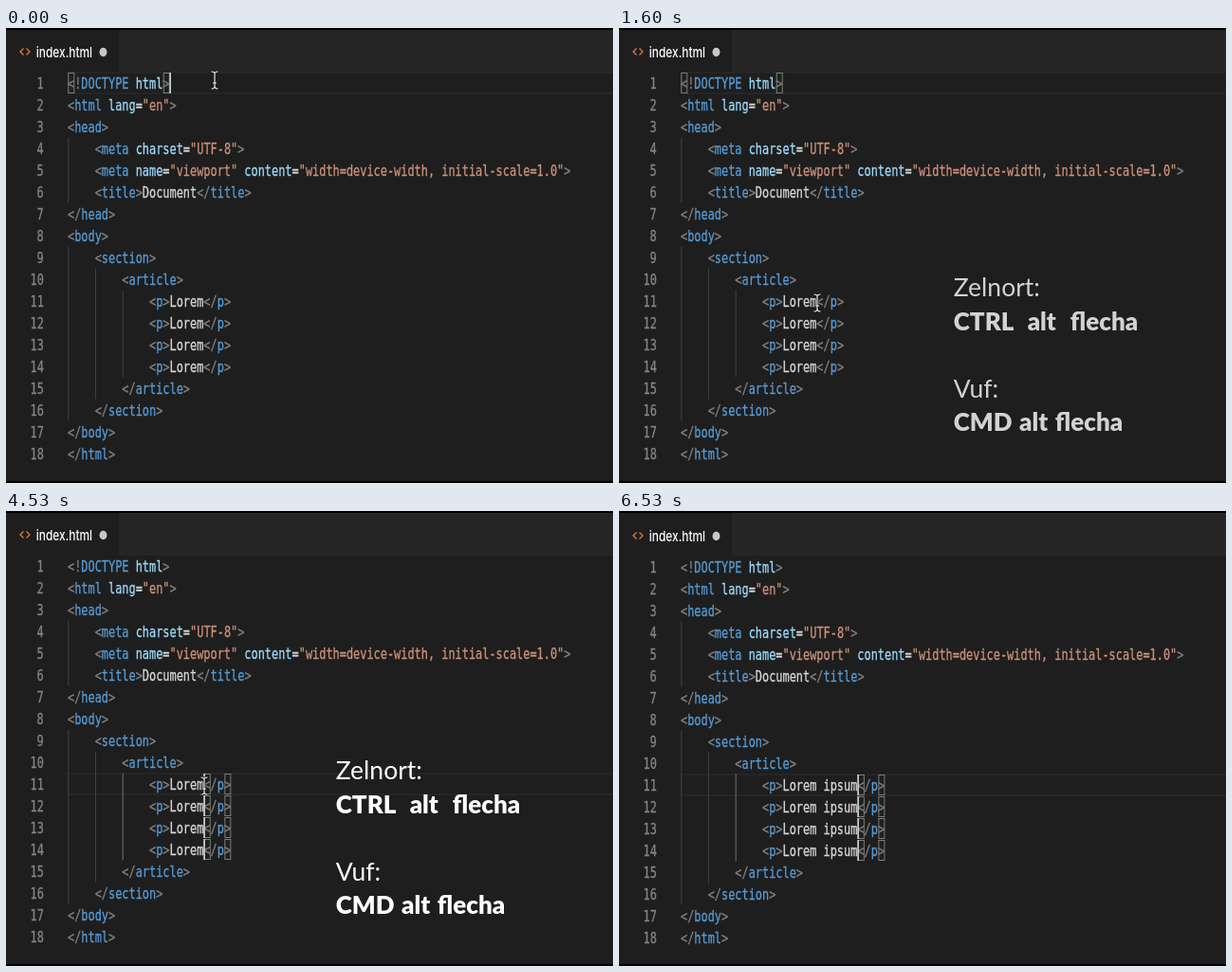
Recreate the animation shown at these times as an HTML page. Size 640 by 480 pixels, loop 6730 ms.

```html
<!DOCTYPE html>
<html lang="en">
<head>
<meta charset="utf-8">
<title>Multi-cursor editing</title>
<style>
html, body { margin: 0; width: 100%; height: 100%; overflow: hidden; background: #1e1e1e; }
svg { display: block; width: 640px; height: 480px; }
text { white-space: pre; }
.mono { font: 15px "DejaVu Sans Mono", monospace; stroke-width: .3px; }
.tab { font: 500 15px Inter, sans-serif; }
.tip { font: 400 26.5px Lato, sans-serif; fill: #fff; }
.keys { font-weight: 900; font-size: 26px; word-spacing: 1.5px; }
.bracket { fill: #006400; fill-opacity: .06; stroke: #7c7c78; }
.caret { fill: #dcdcdc; }
</style>
</head>
<body>
<svg id="stage" viewBox="0 0 640 480"></svg>
<script>
const LOOP = 6730, STEP = 1000 / 15;
const SQUEEZE = 0.7945;
const LEFT = 65, CELL = 9.031 * SQUEEZE, ROW = 23, TOP = 46.5;
const FIRST = 11, COUNT = 4, TEXT_END = 20;
const COLORS = { mark: '#808080', tag: '#569cd6', attr: '#9cdcfe', string: '#ce9178', plain: '#d8d8d8' };

const SOURCE = `<!DOCTYPE html>
<html lang="en">
<head>
    <meta charset="UTF-8">
    <meta name="viewport" content="width=device-width, initial-scale=1.0">
    <title>Document</title>
</head>
<body>
    <section>
        <article>
            <p>Lorem</p>
            <p>Lorem</p>
            <p>Lorem</p>
            <p>Lorem</p>
        </article>
    </section>
</body>
</html>`.split('\n');

const stage = document.getElementById('stage');

function add(parent, name, attrs = {}, content = '') {
  const node = document.createElementNS('http://www.w3.org/2000/svg', name);
  for (const key in attrs) node.setAttribute(key, attrs[key]);
  node.textContent = content;
  parent.appendChild(node);
  return node;
}
const set = (node, attrs) => { for (const key in attrs) node.setAttribute(key, attrs[key]); };
const show = (node, on) => node.setAttribute('visibility', on ? 'visible' : 'hidden');
const colX = col => LEFT + col * CELL;
const rowY = row => TOP + (row - 1) * ROW;
const rect = (parent, x, y, width, height, fill) => add(parent, 'rect', { x, y, width, height, fill });
const ink = color => ({ fill: color, stroke: color });

function label(parent, x, y, content, cls = 'mono', color = COLORS.plain, anchor = 'start') {
  const transform = `translate(${x} ${y}) scale(${SQUEEZE} 1)`;
  return add(parent, 'text', { transform, class: cls, ...ink(color), 'text-anchor': anchor }, content);
}

function paintCode(node, line) {
  node.textContent = '';
  const span = (kind, s) => s && add(node, 'tspan', ink(COLORS[kind]), s);
  for (const part of line.match(/<[^>]*>|[^<]+/g)) {
    const tag = part.match(/^(<[!\/]?)(\w+)(.*)(>)$/);
    if (!tag) { span('plain', part); continue; }
    span('mark', tag[1]);
    span('tag', tag[2]);
    for (const piece of tag[3].match(/"[^"]*"|=|[^="]+/g) || [])
      span(piece[0] === '"' ? 'string' : piece === '=' ? 'plain' : 'attr', piece);
    span('mark', tag[4]);
  }
}

// Window background
rect(stage, 0, 0, 640, 480, '#1e1e1e');
rect(stage, 119, 2, 521, 45, '#252526');

const screen = add(stage, 'g');
add(screen, 'path', { d: 'M18.5 21.5L15 25L18.5 28.5M21.5 21.5L25 25L21.5 28.5', fill: 'none', stroke: '#e37933', 'stroke-width': 1.3 });
add(screen, 'text', { transform: `translate(31.8 30.5) scale(${SQUEEZE} 1)`, class: 'tab', fill: '#fff' }, 'index.html');
add(screen, 'ellipse', { cx: 102.5, cy: 25.5, rx: 4, ry: 4.7, fill: '#c8c8c8' });

const lineBox = add(screen, 'rect', { x: LEFT + .5, width: 600, height: ROW - 1, fill: 'none', stroke: '#282828', 'stroke-width': 1.5 });
const guide = (col, from, to) => rect(screen, colX(col) + .3, rowY(from), 1, (to - from + 1) * ROW, '#404040');
guide(0, 4, 6);
guide(0, 9, 16);
guide(4, 10, 15);
const innerGuide = guide(8, 11, 14);

const lines = SOURCE.map((line, i) => {
  const y = rowY(i + 1) + 17;
  label(screen, 39.8, y, i + 1, 'mono', '#858585', 'end');
  const node = label(screen, LEFT, y, '');
  paintCode(node, line);
  return node;
});

const bracket = (row, col) => add(screen, 'rect', { class: 'bracket', x: colX(col) + .8, y: rowY(row) + 1, width: 6, height: ROW - 2 });
const caret = (row, col) => add(screen, 'rect', { class: 'caret', x: colX(col) - .2, y: rowY(row) + .5, width: 1.5, height: ROW - 1 });

const topOpen = bracket(1, 0), topClose = bracket(1, 14), topCaret = caret(1, 15);
const cursors = Array.from({ length: COUNT }, (_, i) => ({
  row: FIRST + i,
  open: bracket(FIRST + i, TEXT_END),
  close: bracket(FIRST + i, TEXT_END + 3),
  caret: caret(FIRST + i, TEXT_END)
}));

// Suggestion list
const popup = add(screen, 'g');
add(popup, 'rect', { x: 223.5, y: 300.5, width: 430, height: 200, fill: '#252526', stroke: '#454545' });
rect(popup, 224, 301, 416, ROW, '#062f4a');
['i', 'ifr', 'iframe', 'img', 'img:s', 'img:sizes', 'img:srcset', 'img:z'].forEach((word, i) => {
  const y = 312 + i * ROW;
  add(popup, 'path', {
    transform: `translate(233.5 ${y})`, fill: 'none', stroke: '#c5c5c5', 'stroke-width': 1.2,
    d: 'M-6 4.5L0-1.5C-1-5 2-8 5-7L2.5-4L4-2L7-4.5C8-1 5 2 1.5 1L-4 7Q-7 7.5-6 4.5Z'
  });
  const item = label(popup, 246, y + 5, '');
  add(item, 'tspan', { ...ink('#1e87f0'), 'font-weight': 700 }, word[0]);
  add(item, 'tspan', {}, word.slice(1));
});
label(popup, 637.5, 317, 'Emmet Abbreviation', 'mono', '#a9b0b5', 'end');

// Shortcut captions
const tips = add(stage, 'g');
[[283, 'Zelnort:', ''], [318.5, 'CTRL  alt  flecha', ' keys'], [390, 'Vuf:', ''], [424.5, 'CMD alt flecha', ' keys']]
  .forEach(([y, words, cls]) => add(tips, 'text', { x: 0, y, class: 'tip' + cls }, words));

// Mouse pointer
const mouse = add(stage, 'g', { fill: 'none' });
const beam = 'M-3.5-9Q0-9 0-6.5Q0-9 3.5-9M0-7V7M-3.5 9Q0 9 0 6.5Q0 9 3.5 9M-2 3H2';
add(mouse, 'path', { d: beam, stroke: '#111', 'stroke-width': 2.6 });
add(mouse, 'path', { d: beam, stroke: '#eee', 'stroke-width': 1.2 });

rect(stage, 0, 0, 640, 2, '#000');
rect(stage, 0, 478, 640, 2, '#000');

const PATH = [[130, 220, 55], [600, 246, 299], [1070, 208, 288], [1600, 209, 290]];
function mouseAt(t) {
  if (t <= PATH[0][0]) return PATH[0].slice(1);
  for (let i = 1; i < PATH.length; i++) {
    const [t0, x0, y0] = PATH[i - 1], [t1, x1, y1] = PATH[i];
    if (t > t1) continue;
    const u = (t - t0) / (t1 - t0), k = u * u * (3 - 2 * u);
    return [x0 + (x1 - x0) * k, y0 + (y1 - y0) * k];
  }
  return PATH[PATH.length - 1].slice(1);
}

const CLICK = 2330, CUT = 5065;
const ADDED = [CLICK, 2865, 3200, 3530];
const KEYS = [4670, CUT, 5200, 5400, 5530, 5730];
const HIDDEN = [[600, 1065], [1530, 2000], [2800, 2865], [4065, 4530], [5930, 6130], [6330, 6530]];
const within = (t, [from, to]) => t >= from && t < to;
let shownText = '';

function render(ms) {
  const t = Math.floor((ms + 4) / STEP) * STEP;
  const clicked = t >= CLICK, lit = !HIDDEN.some(span => within(t, span));
  const typed = ' ipsum'.slice(0, KEYS.filter(k => t >= k).length);

  set(screen, { transform: `translate(0 ${t >= CUT ? 1 : 0})` });
  set(lineBox, { y: rowY(clicked ? FIRST : 1) + .5 });
  set(innerGuide, { fill: clicked ? '#707070' : '#404040' });
  show(topOpen, t < 2000);
  show(topClose, !clicked);
  show(topCaret, !clicked && lit);

  cursors.forEach((c, i) => {
    const end = TEXT_END + typed.length;
    if (typed !== shownText) paintCode(lines[c.row - 1], SOURCE[c.row - 1].replace('Lorem', 'Lorem' + typed));
    set(c.open, { x: colX(end) + .8 });
    set(c.close, { x: colX(end + 3) + .8 });
    set(c.caret, { x: colX(end) - .2 });
    const paired = t >= ADDED[i] + (i ? 65 : 0);
    show(c.open, paired);
    show(c.close, paired);
    show(c.caret, lit && t >= ADDED[i]);
  });
  shownText = typed;

  show(popup, within(t, [5130, 5265]));

  const rest = Math.max(0, 1 - t / 2000);
  set(tips, { transform: `translate(${347.8 + 125 * rest * rest} 0)`, opacity: 1 - rest });
  show(tips, within(t, [130, CUT]));

  set(mouse, { transform: `translate(${mouseAt(t).join(' ')})` });
  show(mouse, t < KEYS[0]);
}

const start = performance.now();
function tick() {
  render((performance.now() - start) % LOOP);
  requestAnimationFrame(tick);
}
tick();
</script>
</body>
</html>
```
